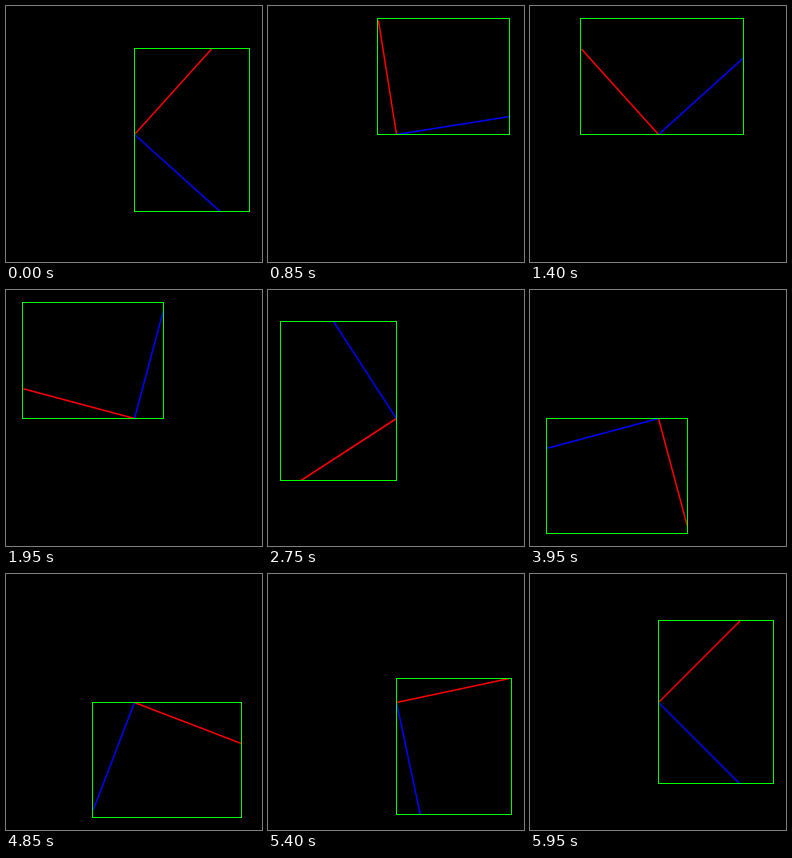
These frames come from a looping animation (256 by 256 pixels, 6 s). An HTML page with a canvas:

```html
<!DOCTYPE html>
<html>
<head>
<meta charset="utf-8">
<style>
html, body { margin: 0; width: 100%; height: 100%; overflow: hidden; background: #000; }
canvas { display: block; }
</style>
</head>
<body>
<canvas id="stage" width="256" height="256"></canvas>
<script>
const ctx = document.getElementById('stage').getContext('2d');
const CENTER = 128, RADIUS = 115.2;
const STEP_MS = 50, STEPS = 120, STEP_DEG = 3, START_DEG = 48;

function pointAt(deg) {
  const a = deg * Math.PI / 180;
  return [CENTER + RADIUS * Math.cos(a), CENTER - RADIUS * Math.sin(a)];
}

// Pixel bounds of the quarter sector that runs from deg - 90 to deg
function sectorBounds(deg) {
  const points = [[CENTER, CENTER], pointAt(deg - 90), pointAt(deg)];
  points.push(pointAt(Math.floor(deg / 90) * 90));
  const xs = points.map(p => Math.floor(p[0] + 1e-6));
  const ys = points.map(p => Math.floor(p[1] + 1e-6));
  return [Math.min(...xs), Math.min(...ys), Math.max(...xs), Math.max(...ys)];
}

function arm(deg, color) {
  const [x, y] = pointAt(deg);
  ctx.strokeStyle = color;
  ctx.lineWidth = 1.5;
  ctx.beginPath();
  ctx.moveTo(CENTER + 0.5, CENTER + 0.5);
  ctx.lineTo(x + 0.5, y + 0.5);
  ctx.stroke();
}

function draw(deg) {
  const [left, top, right, bottom] = sectorBounds(deg);
  const w = right - left, h = bottom - top;
  ctx.fillStyle = '#000';
  ctx.fillRect(0, 0, 256, 256);

  ctx.save();
  ctx.beginPath();
  ctx.rect(left, top, w + 1, h + 1);
  ctx.clip();
  arm(deg, '#f00');
  arm(deg - 90, '#00f');
  ctx.restore();

  ctx.strokeStyle = '#0f0';
  ctx.lineWidth = 1;
  ctx.strokeRect(left + 0.5, top + 0.5, w, h);
}

const start = performance.now();
function tick() {
  const step = Math.floor((performance.now() - start) / STEP_MS) % STEPS;
  draw(START_DEG + step * STEP_DEG);
  requestAnimationFrame(tick);
}
tick();
</script>
</body>
</html>
```
